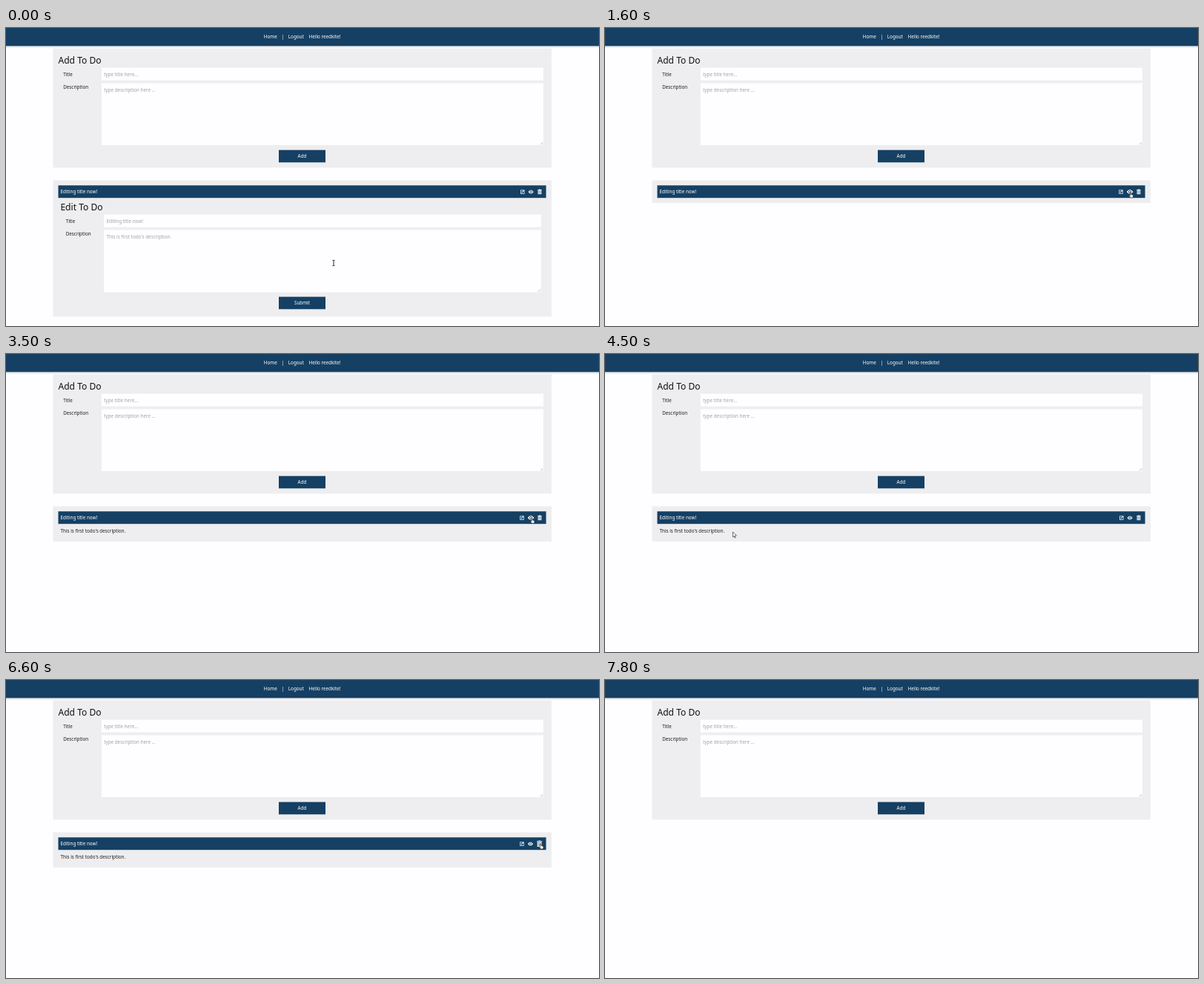
Write an HTML page with a canvas that moves like this. It is 800 px wide and 402 px high and loops after 8.7 s.

```html
<!DOCTYPE html>
<html lang="en">
<head>
<meta charset="utf-8">
<title>To Do</title>
<style>
html, body { margin: 0; width: 100%; height: 100%; overflow: hidden; background: #fefdff; }
canvas { display: block; width: 800px; height: 402px; }
</style>
</head>
<body>
<canvas id="stage"></canvas>
<script>
const W = 800, H = 402, LOOP = 8700, STEP = 100;
const NAVY = '#154064', PANEL = '#eeedef', PAGE = '#fefdff', INK = '#202022', HINT = '#a3a2a6';
const canvas = document.getElementById('stage');
const ctx = canvas.getContext('2d');
const dpr = window.devicePixelRatio || 1;
canvas.width = W * dpr;
canvas.height = H * dpr;

// Pointer path: time, x, y
const path = [
  [0, 442, 317], [100, 442, 317], [900, 706, 226], [1100, 709, 222],
  [3200, 709.5, 221.5], [3800, 709.5, 221.5], [4500, 172.5, 240],
  [4600, 172.5, 240], [5500, 312, 245], [5700, 312, 245], [6300, 740, 229],
  [6600, 721.5, 221], [7200, 721.5, 221], [7800, 722, 406], [LOOP, 722, 406]
];

// Content of the to-do card from each time on
const views = [[0, 'edit'], [1600, 'closed'], [2400, 'open'], [2800, 'closed'], [3500, 'open'], [7300, 'gone']];

function pointerAt(t) {
  const i = path.findIndex(k => k[0] > t);
  const [t0, x0, y0] = path[i - 1], [t1, x1, y1] = path[i];
  const p = (t - t0) / (t1 - t0), e = p * p * (3 - 2 * p);
  return { x: x0 + (x1 - x0) * e, y: y0 + (y1 - y0) * e };
}

function viewAt(t) {
  return views.filter(v => v[0] <= t).pop()[1];
}

function box(x0, y0, x1, y1, color) {
  ctx.fillStyle = color;
  ctx.fillRect(x0, y0, x1 - x0, y1 - y0);
}

function text(str, x, y, color = INK, size = 6.3, align = 'left') {
  ctx.font = `${size}px "Noto Sans", "Open Sans", sans-serif`;
  ctx.textAlign = align;
  ctx.fillStyle = color;
  ctx.fillText(str, x, y);
}

function shape(points, fill, stroke, width = 0.7) {
  ctx.beginPath();
  points.forEach(([x, y]) => ctx.lineTo(x, y));
  ctx.closePath();
  if (fill) { ctx.fillStyle = fill; ctx.fill(); }
  if (stroke) { ctx.strokeStyle = stroke; ctx.lineWidth = width; ctx.stroke(); }
}

function line(x0, y0, x1, y1, color, width) {
  ctx.beginPath();
  ctx.moveTo(x0, y0);
  ctx.lineTo(x1, y1);
  ctx.strokeStyle = color;
  ctx.lineWidth = width;
  ctx.stroke();
}

function placed(x, y, scale, draw) {
  ctx.save();
  ctx.translate(x, y);
  ctx.scale(scale, scale);
  draw();
  ctx.restore();
}

function button(label, y) {
  box(368, y, 431, y + 16.7, NAVY);
  text(label, 399.5, y + 10.8, '#fff', 6.3, 'center');
}

function form(x, y, right, bottom, labelX, title, desc) {
  text('Title', labelX, y + 11);
  text('Description', labelX, y + 27.9);
  box(x, y, right, y + 17, PAGE);
  box(x, y + 20.7, right, bottom, PAGE);
  text(title, x + 3.4, y + 11.2, HINT);
  text(desc, x + 3.4, y + 32, HINT);
  line(right - 4, bottom - 0.8, right - 0.8, bottom - 4, '#8b8b8d', 0.5);
  line(right - 2, bottom - 0.8, right - 0.8, bottom - 2, '#8b8b8d', 0.5);
}

function editIcon() {
  ctx.strokeStyle = '#e8eef3';
  ctx.lineWidth = 0.8;
  ctx.strokeRect(-2.3, -2.2, 4.6, 4.6);
  line(-1.1, 1.2, 2.2, -2.1, '#e8eef3', 1.1);
}

function eyeIcon() {
  ctx.beginPath();
  ctx.moveTo(-3.6, 0);
  ctx.quadraticCurveTo(0, -5, 3.6, 0);
  ctx.quadraticCurveTo(0, 5, -3.6, 0);
  ctx.fillStyle = '#fff';
  ctx.fill();
  ctx.beginPath();
  ctx.arc(0, 0, 1.35, 0, Math.PI * 2);
  ctx.strokeStyle = NAVY;
  ctx.lineWidth = 0.8;
  ctx.stroke();
}

function trashIcon() {
  box(-2.8, -3, 2.8, -2.1, '#fff');
  box(-1, -3.5, 1, -2.8, '#fff');
  box(-2.4, -1.7, 2.4, 3.2, '#f2f5f8');
  for (const x of [-1.2, 0, 1.2]) line(x, -0.9, x, 2.4, NAVY, 0.4);
}

function icons(hover) {
  const shift = hover ? 0.8 : 0;
  placed(696.8 - shift, 221, 1, editIcon);
  placed(708.3 - (hover === 'trash' ? 0.8 : 0.2), 221, hover === 'eye' ? 1.2 : 1, eyeIcon);
  placed(720 - (hover === 'trash' ? 0.3 : 0), 221, hover === 'trash' ? 1.25 : 1, trashIcon);
}

function card(view, hover) {
  const bottom = { edit: 389.4, open: 253, closed: 236 }[view];
  box(63.5, 205.5, 736, bottom, PANEL);
  box(70.5, 212.3, 728.6, 229.2, NAVY);
  text('Editing title now!', 73.6, 223.2, '#fff');
  icons(hover);
  if (view === 'open') text("This is first todo's description.", 73.5, 240.7);
  if (view === 'edit') {
    text('Edit To Do', 73.4, 245.6, '#111', 12.1);
    form(132, 251.7, 722, 356.4, 80.7, 'Editing title now!', "This is first todo's description.");
    button('Submit', 362.6);
  }
}

function page() {
  box(0, 0, W, H, PAGE);
  const shade = ctx.createLinearGradient(0, 24, 0, 27);
  shade.addColorStop(0, '#c6ccd3');
  shade.addColorStop(1, PAGE);
  box(0, 24, W, 27, shade);
  box(0, 0, W, 24.2, NAVY);
  text('Home', 347.8, 14.3, '#fff');
  text('|', 372, 14.3, '#fff');
  text('Logout', 380.8, 14.3, '#fff');
  text('Hello reedkite!', 408.6, 14.3, '#fff');
  box(63.5, 27.6, 736, 188.4, PANEL);
  text('Add To Do', 70.4, 47.7, '#111', 12.1);
  form(128.8, 53.7, 725, 158, 77.2, 'type title here...', 'type description here ...');
  button('Add', 164.6);
}

function hoverAt({ x, y }) {
  if (y < 217 || y > 225.5) return '';
  if (x > 704 && x < 713) return 'eye';
  return x > 716 && x < 724 ? 'trash' : '';
}

function overText({ x, y }, view) {
  const inField = view === 'edit' && x > 132 && x < 722 && y > 251.7 && y < 356.4;
  const inLine = view === 'open' && x > 73 && x < 162 && y > 232 && y < 246;
  return inField || inLine;
}

function arrow() {
  shape([[0, 0], [0, 7], [1.6, 5.6], [2.7, 8], [3.8, 7.5], [2.7, 5.2], [4.9, 5]], '#fff', '#333');
}

function hand() {
  shape([[-0.6, 0], [0.6, 0], [0.7, 2.5], [3.4, 3.3], [3.5, 5.3], [2.7, 7], [0, 7], [-2.1, 4.4], [-1.5, 3.7], [-0.6, 4.3]],
    '#fff', '#111', 0.6);
}

function beam() {
  line(0, -3.6, 0, 3.6, '#111', 0.9);
  line(-1.7, -3.6, 1.7, -3.6, '#111', 0.7);
  line(-1.7, 3.6, 1.7, 3.6, '#111', 0.7);
}

function render(t) {
  const at = pointerAt(t), view = viewAt(t);
  const hover = view === 'gone' ? '' : hoverAt(at);
  ctx.setTransform(dpr, 0, 0, dpr, 0, 0);
  page();
  if (view !== 'gone') card(view, hover);
  placed(at.x, at.y, 1, hover ? hand : overText(at, view) ? beam : arrow);
}

const start = performance.now();
function tick() {
  const t = (performance.now() - start) % LOOP;
  render(Math.floor(t / STEP) * STEP);
  requestAnimationFrame(tick);
}
tick();
</script>
</body>
</html>
```
